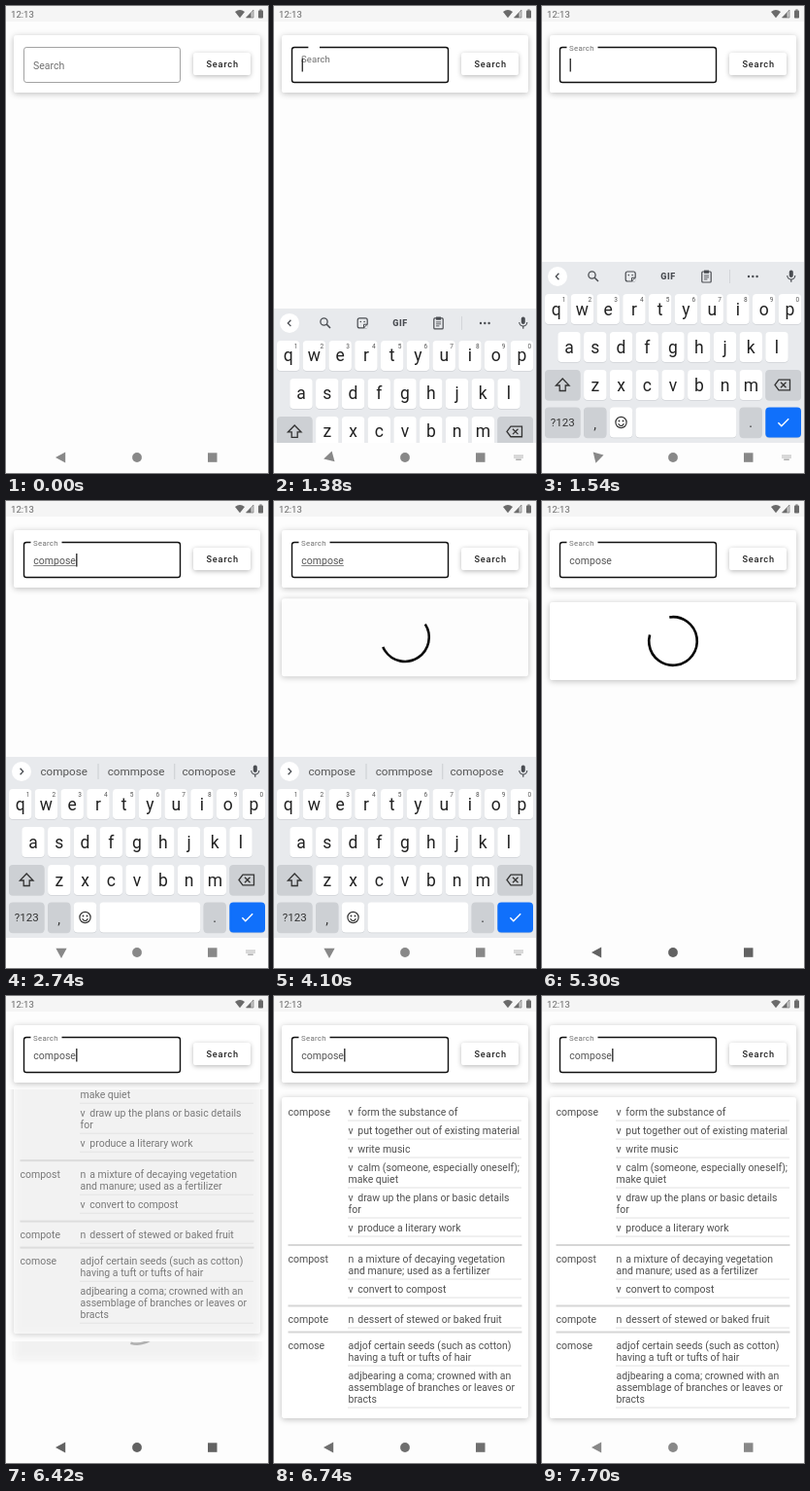
Animation, 270 px wide and 480 px high, one loop 8 s. Source, as an HTML page with a canvas:

```html
<!DOCTYPE html>
<html lang="en">
<head>
<meta charset="utf-8">
<title>Dictionary search</title>
<style>
html, body { margin: 0; width: 100%; height: 100%; overflow: hidden; background: #fdfdfd; }
canvas { display: block; width: 270px; height: 480px; }
</style>
</head>
<body>
<canvas id="stage"></canvas>
<script>
const W = 270, H = 480, LOOP = 8000, SPEED = 1.414;
const canvas = document.getElementById('stage');
const ctx = canvas.getContext('2d');
const dpr = window.devicePixelRatio || 1;
canvas.width = W * dpr;
canvas.height = H * dpr;

// The screen refreshes in bursts: [first refresh, count], 80 ms apart.
const bursts = [[0, 1], [500, 1], [1380, 3], [1700, 2], [2020, 3], [2340, 3], [2660, 3],
  [2980, 1], [3140, 1], [3700, 2], [3940, 3], [4260, 3], [4580, 3], [4900, 4], [5300, 3],
  [5620, 3], [5940, 3], [6260, 3], [6580, 3], [6900, 3], [7220, 3], [7700, 1]];
const ticks = bursts.flatMap(([t, n]) => Array.from({ length: n }, (_, i) => t + 80 * i));
const keyTimes = [1700, 2020, 2100, 2340, 2500, 2660, 2740];
const blinks = [500, 3140, 3700, 4020, 4340, 4660, 4980, 5300, 5620, 5940, 6260, 7220, 7700];

const TOP = 96, LIST_H = 346, LOADER_H = 96;
const entries = [
  { word: 'compose', y: 119, rule: 256, defs: [
    ['v', 'form the substance of'], ['v', 'put together out of existing material'],
    ['v', 'write music'], ['v', 'calm (someone, especially oneself);', 'make quiet'],
    ['v', 'draw up the plans or basic details', 'for'], ['v', 'produce a literary work']] },
  { word: 'compost', y: 270, rule: 318.5, defs: [
    ['n', 'a mixture of decaying vegetation', 'and manure; used as a fertilizer'],
    ['v', 'convert to compost']] },
  { word: 'compote', y: 332, rule: 345.5, defs: [['n', 'dessert of stewed or baked fruit']] },
  { word: 'comose', y: 359, defs: [
    ['adj', 'of certain seeds (such as cotton)', 'having a tuft or tufts of hair'],
    ['adj', 'bearing a coma; crowned with an', 'assemblage of branches or leaves or', 'bracts']] }
];

const clamp = v => Math.max(0, Math.min(1, v));
const ramp = (t, a, b) => clamp((t - a) / (b - a));
const mix = (a, b, k) => a + (b - a) * k;

function spring(t, start) {
  const x = Math.max(0, t - start) * 0.02 * SPEED;
  return 1 - (1 + x) * Math.exp(-x);
}

// Cubic curve (0.4, 0, 0.2, 1).
function standardEase(x) {
  let lo = 0, hi = 1;
  for (let i = 0; i < 20; i++) {
    const s = (lo + hi) / 2, r = 1 - s;
    if (1.2 * r * r * s + 0.6 * r * s * s + s * s * s < x) lo = s; else hi = s;
  }
  return 3 * (1 - lo) * lo * lo + lo * lo * lo;
}

function text(str, x, y, size, color, { align = 'left', weight = 400, gap = 0 } = {}) {
  ctx.font = `${weight} ${size}px Roboto, sans-serif`;
  ctx.letterSpacing = gap + 'px';
  ctx.textAlign = align;
  ctx.textBaseline = 'alphabetic';
  ctx.fillStyle = color;
  ctx.fillText(str, x, y + size * 0.355);
}

function box(x, y, w, h, r, fill) {
  ctx.beginPath();
  ctx.roundRect(x, y, w, h, r);
  if (fill) { ctx.fillStyle = fill; ctx.fill(); }
}

function rect(x, y, w, h, fill) {
  ctx.fillStyle = fill;
  ctx.fillRect(x, y, w, h);
}

function disc(x, y, r, fill) {
  ctx.beginPath();
  ctx.arc(x, y, r, 0, 7);
  ctx.fillStyle = fill;
  ctx.fill();
}

function poly(points, fill, close = true) {
  ctx.beginPath();
  points.forEach(([x, y]) => ctx.lineTo(x, y));
  if (close) ctx.closePath();
  if (fill) { ctx.fillStyle = fill; ctx.fill(); }
}

function stroke(color, width) {
  ctx.strokeStyle = color;
  ctx.lineWidth = width;
  ctx.stroke();
}

function line(points, color, width) {
  poly(points, null, false);
  stroke(color, width);
}

function raised(x, y, w, h, blur = 6, alpha = 0.25) {
  ctx.save();
  ctx.shadowColor = `rgba(0,0,0,${alpha})`;
  ctx.shadowBlur = blur * dpr;
  ctx.shadowOffsetY = 1.2 * dpr;
  box(x, y, w, h, 2.6, '#fff');
  ctx.restore();
}

function clipped(x, y, w, h, alpha, draw) {
  ctx.save();
  ctx.beginPath();
  ctx.rect(x, y, w, h);
  ctx.clip();
  ctx.globalAlpha = alpha;
  draw();
  ctx.restore();
}

function statusBar() {
  const c = '#6a6a6a';
  rect(0, 0, W, 16, '#f5f5f5');
  text('12:13', 5, 8.3, 9.6, c);
  ctx.beginPath();
  ctx.moveTo(241, 12.3);
  ctx.lineTo(236, 6);
  ctx.quadraticCurveTo(241, 2, 246, 6);
  ctx.fillStyle = c;
  ctx.fill();
  poly([[247.5, 12], [255, 12], [255, 4]], '#c9c9c9');
  poly([[247.5, 12], [252.5, 12], [252.5, 6.7]], c);
  line([[247.5, 12], [255, 12], [255, 4], [247.5, 12]], c, 0.6);
  box(260, 4.5, 5, 8, 0.8, c);
  rect(261.4, 3.5, 2.2, 1.2, c);
}

function searchCard(t, typed) {
  raised(8, 30, 254, 59);
  const k = ramp(t, 1340, 1450), focused = k > 0;
  box(18.5, 42.5, 161, 36, 2.6);
  stroke(focused ? '#111' : '#8c8c8c', focused ? 1.4 : 0.8);
  if (focused) rect(mix(41, 25.5, k), 41, 32 * k, 3, '#fff');
  text('Search', 28, mix(61.2, 42.7, k), mix(10.5, 7.9, k), '#707070', { gap: 0.26 * k });

  text(typed, 28.3, 61.2, 10.5, '#555');
  const width = typed ? ctx.measureText(typed).width : 0;
  if (typed && t < 4660) rect(28.3, 66, width, 0.8, '#666');
  const typing = t >= 1380 && t < 3140;
  if (typing || blinks.filter(b => b <= t).length % 2) rect(28.6 + width, 54, 1.3, 13.5, '#222');

  raised(193, 48, 59, 23, 5, 0.28);
  if (t >= 3700 && t < 4100) {
    ctx.save();
    box(193, 48, 59, 23, 2.6);
    ctx.clip();
    disc(222.5, 59.5, 10 + 28 * ramp(t, 3640, 3840), `rgba(0,0,0,${0.12 * (1 - ramp(t, 3860, 4100))})`);
    ctx.restore();
  }
  text('Search', 223.2, 60.2, 9.2, '#222', { align: 'center', weight: 500, gap: 0.82 });
}

function spinner(t, y) {
  const time = Math.max(0, 275 + (t - 4100) * SPEED);
  const turn = Math.floor(time / 1332), phase = time % 1332;
  const head = 290 * standardEase(clamp(phase / 666));
  const tail = 290 * standardEase(clamp(phase / 666 - 1));
  const base = turn * 216 - 90 + phase / 1332 * 286;
  const rad = Math.PI / 180;
  ctx.beginPath();
  ctx.arc(135, y, 24.8, (base + tail - 2) * rad, (base + head + 2) * rad);
  stroke('#000', 2.6);
}

function loader(t, top, size) {
  const shown = size * LOADER_H;
  clipped(0, top, W, shown, size, () => {
    const y = top + shown - LOADER_H;
    raised(8, y + 8, 254, 80);
    spinner(t, y + 48);
  });
}

function results(size) {
  const shown = size * LIST_H;
  clipped(0, TOP, W, shown + 2, size, () => {
    ctx.translate(0, shown - LIST_H);
    raised(8, 104, 254, 330);
    for (const { word, y, rule, defs } of entries) {
      text(word, 14.5, y, 10.5, '#505050');
      let row = y;
      for (const [kind, ...lines] of defs) {
        text(kind, 76.5, row, 10.5, '#505050');
        const indent = Math.max(9.8, ctx.measureText(kind).width);
        lines.forEach((s, i) => text(s, 76.5 + (i ? 0 : indent), row + 12 * i, 10.5, '#505050'));
        row += 7 + 12 * lines.length;
        rect(76, row - 10.3, 179, 0.7, '#d4d4d4');
      }
      if (rule) rect(14.5, rule - 1, 241, 2, '#d6d6d6');
    }
  });
}

function key(x, y, w, fill = '#fff') {
  box(x, y + 0.8, w, 31, 4, '#cfd2d6');
  box(x, y, w, 31, 4, fill);
}

function letters(str, x, y, digits) {
  [...str].forEach((ch, i) => {
    const cx = x + 26.75 * i;
    key(cx - 11.7, y, 23.4);
    text(ch, cx, y + 15.3, 17.5, '#222', { align: 'center' });
    if (digits) text(String((i + 1) % 10), cx + 8, y + 5.6, 6.5, '#555', { align: 'center' });
  });
}

function toolIcons(c) {
  ctx.beginPath();
  ctx.arc(51.5, 276.5, 3.6, 0, 7);
  stroke(c, 1.3);
  line([[54.2, 279.2], [58, 283]], c, 1.5);
  box(86.2, 273, 10, 10, 2);
  stroke(c, 1.2);
  poly([[92.5, 283.5], [96.8, 283.5], [96.8, 279]], '#e8eaed');
  line([[92.5, 283], [92.5, 279.3], [96, 279.3], [92.5, 283]], c, 1);
  disc(89.3, 276.6, 0.8, c);
  disc(93.1, 276.6, 0.8, c);
  text('GIF', 130, 278.2, 9, c, { align: 'center', weight: 900, gap: 0.5 });
  box(164.8, 273, 9.4, 11, 1);
  stroke(c, 1.2);
  rect(167, 271.6, 5, 3.2, c);
  for (let i = 0; i < 3; i++) {
    rect(167, 276.5 + 2 * i, i < 2 ? 5 : 3.4, 0.9, c);
    disc(213 + 4.3 * i, 278, 1.2, c);
  }
  rect(193, 271, 0.8, 14, '#cdd0d4');
}

function suggestions(typed) {
  const words = typed === 'compose' ? ['compose', 'commpose', 'comopose'] : [typed, 'come', 'company'];
  words.forEach((w, i) => text(w, [59.7, 134, 209][i], 278.2, 11.7, '#555', { align: 'center' }));
  rect(94.6, 270, 0.8, 16, '#c4c7cb');
  rect(173.4, 270, 0.8, 16, '#c4c7cb');
}

function keyboard(typed) {
  const c = '#4a4d52', grey = '#cdd0d4';
  rect(0, 263, W, 217, '#e8eaed');
  disc(16, 278, 10, '#fff');
  const d = typed ? 1 : -1;
  line([[16 - 1.4 * d, 274.8], [16 + 1.7 * d, 278], [16 - 1.4 * d, 281.2]], c, 1.3);
  if (typed) suggestions(typed); else toolIcons(c);
  box(254.8, 271.5, 4, 7.6, 2, c);
  ctx.beginPath();
  ctx.arc(256.8, 277, 4, 0, Math.PI);
  stroke(c, 1.1);
  rect(256.2, 281, 1.2, 2.8, c);

  letters('qwertyuiop', 14.7, 296, true);
  letters('asdfghjkl', 28, 335);
  letters('zxcvbnm', 54.8, 374);
  key(3, 374, 36.5, grey);
  poly([[21.2, 383], [28, 390], [24.2, 390], [24.2, 395.5], [18.2, 395.5], [18.2, 390], [14.4, 390]]);
  stroke('#333', 1.3);
  key(230.3, 374, 36.7, grey);
  poly([[240, 389.5], [244, 384.2], [255.5, 384.2], [255.5, 394.8], [244, 394.8]]);
  stroke('#333', 1.3);
  line([[246, 386.8], [251.5, 392.2]], '#333', 1.3);
  line([[251.5, 386.8], [246, 392.2]], '#333', 1.3);

  key(3, 412.5, 36.5, grey);
  text('?123', 21.2, 428, 11.5, '#333', { align: 'center' });
  key(43, 412.5, 23.4, grey);
  text(',', 54.7, 430, 14, '#333', { align: 'center' });
  key(69.8, 412.5, 23.4);
  ctx.beginPath();
  ctx.arc(81.5, 428, 5.6, 0, 7);
  stroke('#333', 1.2);
  disc(79.5, 426.5, 0.9, '#333');
  disc(83.5, 426.5, 0.9, '#333');
  ctx.beginPath();
  ctx.arc(81.5, 428.6, 2.8, 0.2, 2.94);
  stroke('#333', 1.1);
  key(96.5, 412.5, 103.8);
  key(203.6, 412.5, 23.2, grey);
  text('.', 215.2, 428, 14, '#333', { align: 'center' });
  key(230.3, 412.5, 36.7, '#1070fb');
  line([[243.4, 428.3], [246.8, 431.7], [254.2, 424.2]], '#fff', 1.5);
}

function navBar(t, open) {
  const dark = ramp(t, 4580, 5140) - ramp(t, 6580, 7060);
  const g = Math.round(mix(136, 98, dark)), c = `rgb(${g},${g},${g})`;
  rect(0, 449, W, 31, '#fdfdfd');
  const turn = ramp(t, 1340, 1580) - ramp(t, 4700, 5060);
  ctx.save();
  ctx.translate(57, 464);
  ctx.rotate(-turn * Math.PI / 2);
  poly([[-6, 0], [4.2, -5.6], [4.2, 5.6]], c);
  ctx.restore();
  disc(135, 464, 4.9, c);
  rect(208, 459.3, 9.5, 9.5, c);
  if (open > 0.5) {
    for (let i = 0; i < 10; i++) rect(247.4 + 2 * (i % 5), 461.5 + 2 * Math.floor(i / 5), 1.2, 1.2, '#999');
    rect(249.2, 465.6, 5.6, 1.2, '#999');
  }
}

function draw(t) {
  const typed = 'compose'.slice(0, keyTimes.filter(k => k <= t).length);
  ctx.setTransform(dpr, 0, 0, dpr, 0, 0);
  rect(0, 0, W, H, '#fdfdfd');
  statusBar();
  searchCard(t, typed);

  const list = spring(t, 6325);
  const load = spring(t, 3923) - spring(t, 6328);
  if (load > 0.004) loader(t, TOP + list * LIST_H, load);
  if (list > 0) results(list);

  const rise = 1 - (1 - ramp(t, 1300, 1520)) ** 3;
  const open = rise - ramp(t, 4540, 4940) ** 2;
  if (open > 0) {
    ctx.save();
    ctx.translate(0, (1 - open) * 186);
    keyboard(typed);
    ctx.restore();
  }
  navBar(t, open);
}

function frame() {
  const t = performance.now() % LOOP;
  draw(ticks.filter(k => k <= t).pop());
  requestAnimationFrame(frame);
}
frame();
</script>
</body>
</html>
```
